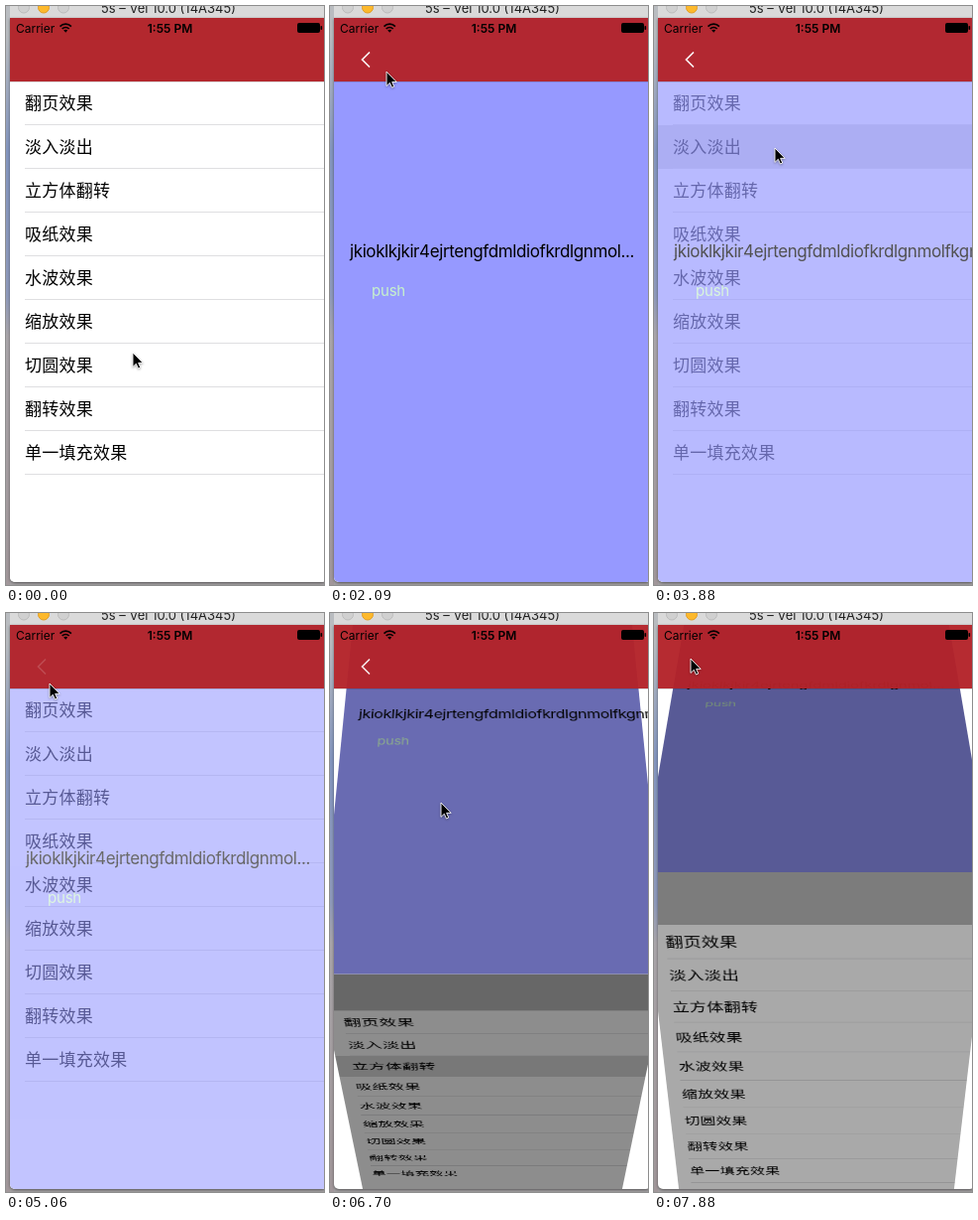
Write an HTML page that moves like this. It is 321 px wide and 583 px high and loops after 8000 ms.

```html
<!DOCTYPE html>
<html lang="zh-CN">
<head>
<meta charset="utf-8">
<style>
html, body { margin: 0; width: 100%; height: 100%; overflow: hidden; }
body { position: relative; background: #a3a0a2; font-family: Inter, sans-serif; color: #000; }
div, svg { position: absolute; }
#desk { left: 0; top: 0; width: 4px; height: 583px; background: linear-gradient(#b9bcc0 5%, #8496bf 25%, #8f9abb 50%, #aaa6aa 57%, #a1979a); }
#title { left: 4px; top: 0; width: 317px; height: 12px; background: #dadada; overflow: hidden; }
#title span { position: absolute; left: 0; width: 320px; top: -7px; text-align: center; font-size: 13px; line-height: 18px; white-space: nowrap; color: #222; }
#phone { left: 4px; top: 12px; width: 320px; height: 568px; background: #fff; overflow: hidden; perspective: 1250px; border-radius: 0 0 5px 5px; box-shadow: 0 1px 3px #0007; }
.page { inset: 0; }
#list { background: linear-gradient(#bbb 64px, #fff 64px); }
#detail { background: #9699ff; }
.row { left: 0; width: 320px; height: 44px; font: 17px/42px "Noto Sans CJK SC", "Noto Sans CJK JP", "Noto Sans CJK", sans-serif; letter-spacing: .25px; text-indent: 15px; }
.row::after { content: ""; position: absolute; left: 15px; right: 0; bottom: 0; height: 1px; background: #dfdfe1; }
#label { left: 16px; top: 224px; font-size: 17px; line-height: 22px; letter-spacing: -.4px; white-space: nowrap; }
#push { left: 38px; top: 265px; font-size: 15px; line-height: 20px; letter-spacing: -.2px; color: #c6f2cb; }
#flap { left: 0; width: 320px; transform-origin: 0 0; background: linear-gradient(#f4f4f4, #fff 35%, #d2d2d2 75%, #8d8d8d); box-shadow: 0 0 12px #0006; }
#bar { left: 0; top: 0; width: 320px; height: 64px; background: rgba(179, 35, 41, .96); box-shadow: 0 1px #0002; z-index: 2; }
#over { left: 0; top: 0; }
</style>
</head>
<body>
<div id="desk"></div>
<div id="title"><span>5s – Vel 10.0 (14A345)</span></div>
<div id="phone">
  <div id="list" class="page"></div>
  <div id="flap"></div>
  <div id="detail" class="page"><div id="label"></div><div id="push">push</div></div>
  <div id="bar"></div>
</div>
<svg id="over" width="321" height="583">
  <g stroke="#bcbcbc" fill="#d0d0d0"><circle cx="18" cy="1.5" r="5.5"/><circle cx="38" cy="1.5" r="5.5" fill="#fdb92c" stroke="#e09e28"/><circle cx="58" cy="1.5" r="5.5"/></g>
  <g font-size="12"><text x="10" y="26.5">Carrier</text><text x="165.5" y="26.5" font-weight="600" text-anchor="middle">1:55 PM</text></g>
  <path d="M54.5 20.6a8 8 0 0 1 11.4 0M56.7 23a5 5 0 0 1 7 0" fill="none" stroke="#000" stroke-width="1.7"/>
  <path d="M60.2 26.8l-2-2.2a3 3 0 0 1 4 0z"/>
  <rect x="294" y="17" width="23" height="10" rx="2"/><rect x="317.5" y="20" width="1.6" height="4" rx=".8"/>
  <path id="back" d="M40 46.5L32.5 54L40 61.5" fill="none" stroke="#fff" stroke-width="1.6"/>
  <path id="cursor" d="M0 0V16l3.7-3.5 2.4 5.3 2.5-1.1-2.3-5.2h5z" stroke="#fff" style="filter: drop-shadow(0 1px 1px #0005)"/>
</svg>
<script>
const $ = id => document.getElementById(id);
const TICK = 148.7, LOOP = 8000, LENGTH = 480;
const ramp = (t, from, to) => {
  const k = Math.max(0, Math.min(1, (t - from) / (to - from)));
  return k * k * (3 - 2 * k);
};
const mix = (a, b, k) => a.map((v, i) => v + (b[i] - v) * k);

const names = ['翻页效果', '淡入淡出', '立方体翻转', '吸纸效果', '水波效果', '缩放效果', '切圆效果', '翻转效果', '单一填充效果'];
const rows = names.map((name, i) => {
  const row = document.createElement('div');
  row.className = 'row';
  row.style.top = 64 + 44 * i + 'px';
  row.textContent = name;
  $('list').append(row);
  return row;
});

// each visit taps a row to open the page, then taps back to close it
const visits = [
  { effect: 'curl', open: 1100, close: 2300, row: [180, 80], back: [38, 63] },
  { effect: 'fade', open: 3569, close: 4842, row: [121, 142], back: [43, 70] },
  { effect: 'cube', open: 6420, close: 7625, row: [111, 190], back: [36, 45] }
];

function pointer(t) {
  let at = [127, 348], free = 0;
  for (const v of visits) {
    at = mix(at, v.row, ramp(t, free, v.open - 460));
    at = mix(at, v.back, ramp(t, v.open + 570, v.close - 100));
    free = v.close + 300;
  }
  return at;
}

function turn(page, angle, on) {
  page.style.transform = on ? `translateZ(-284px) rotateX(${angle}deg) translateZ(284px)` : 'none';
  page.style.filter = on ? `brightness(${1 - .75 * Math.abs(angle) / 90})` : 'none';
}

function curl(q, on) {
  const left = 700 - 800 * q, right = 570 - 700 * q, h = Math.min(120, 300 * q), flap = $('flap').style;
  $('list').style.clipPath = on ? `polygon(0 0, 320px 0, 320px ${right}px, 0 ${left}px)` : 'none';
  $('list').style.zIndex = flap.zIndex = on ? 1 : 0;
  flap.display = on ? 'block' : 'none';
  flap.top = left - h + 'px';
  flap.height = h + 'px';
  flap.transform = `skewY(${Math.atan2(right - left, 320)}rad)`;
}

function draw(time) {
  const t = Math.floor((time + 3) / TICK) * TICK;
  const index = Math.max(0, visits.findLastIndex(v => v.open <= t));
  const { effect, open, close } = visits[index];
  const opening = t < close;
  const start = opening ? open : close;
  const p = ramp(t, start, start + LENGTH);
  const q = opening ? p : 1 - p, busy = p > 0 && p < 1;
  const angle = 90 * (1 - q), cube = busy && effect === 'cube';

  curl(q, busy && effect === 'curl');
  turn($('detail'), angle, cube);
  turn($('list'), angle - 90, cube);
  $('detail').style.visibility = q > 0 ? 'visible' : 'hidden';
  $('detail').style.opacity = effect === 'fade' ? q : 1;

  rows.forEach((r, i) => r.style.background = opening && busy && i === index ? '#d9d9d9' : 'none');
  $('label').textContent = 'jkioklkjkir4ejrtengfdmldiofkrdlgnmol' + (opening && busy ? 'fkgnrkdl' : '...');
  $('back').style.opacity = opening ? Math.min(1, 1.5 * p) : Math.max(0, 1 - 2 * p);
  const [x, y] = pointer(t);
  $('cursor').setAttribute('transform', `translate(${x + 1} ${y + 1}) scale(.9)`);
}

const begin = performance.now();
function tick() {
  draw((performance.now() - begin) % LOOP);
  requestAnimationFrame(tick);
}
tick();
</script>
</body>
</html>
```
